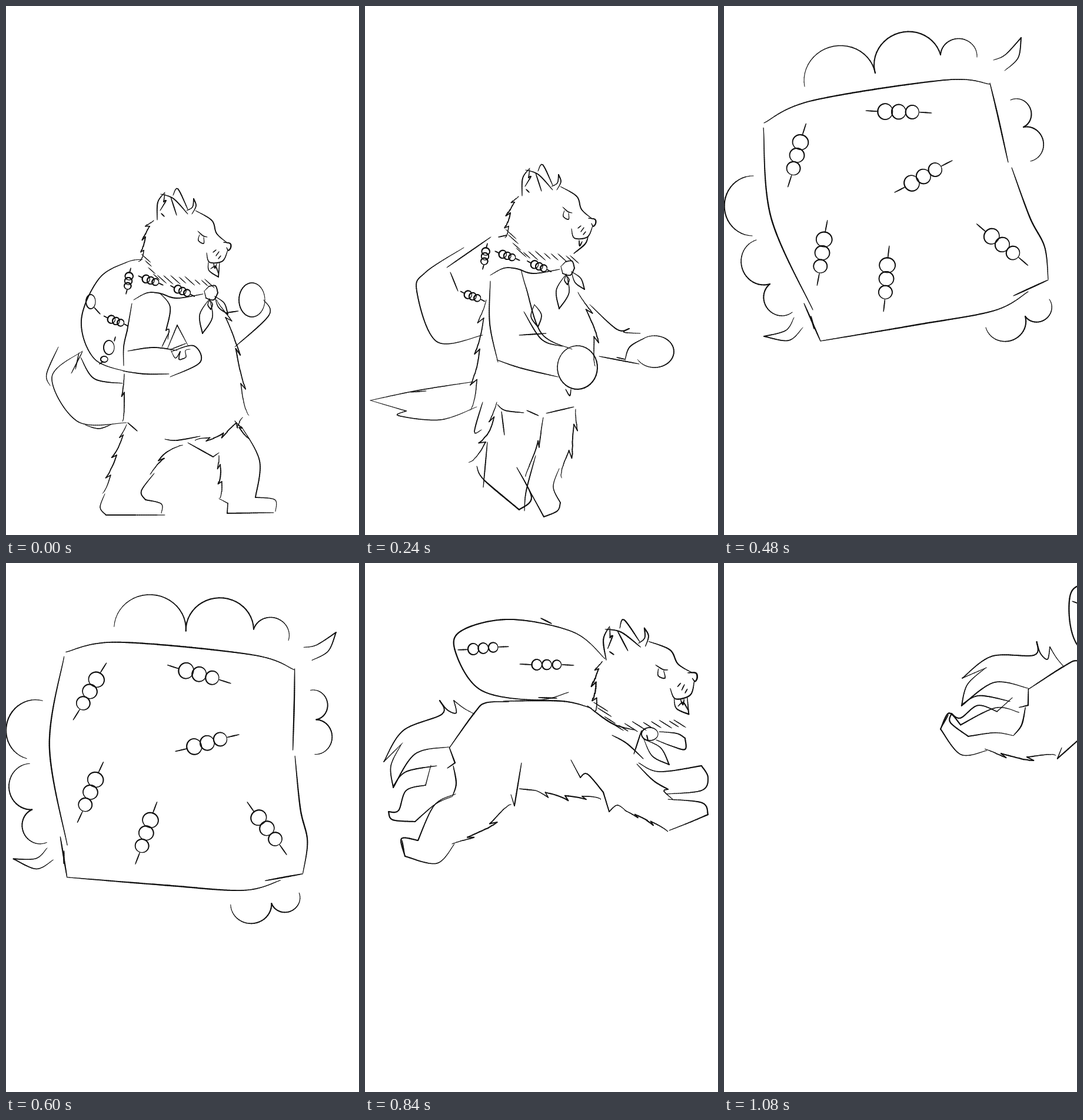
Write an HTML page with a canvas that moves like this. It is 600 by 900 pixels and loops after 1.2 s.

```html
<!DOCTYPE html>
<html lang="en">
<head>
<meta charset="utf-8">
<title>Leaping wolf sketch</title>
<style>
html, body { margin: 0; width: 100%; height: 100%; overflow: hidden; background: #fff; }
canvas { display: block; }
</style>
</head>
<body>
<canvas id="stage" width="600" height="900"></canvas>
<script>
const ctx = document.getElementById('stage').getContext('2d');
const STEP = 120;
let seed;

const random = () => (seed = (seed * 16807) % 2147483647) / 2147483647;
const points = text => text.trim().split(/\s+/).map(p => p.split(',').map(Number));

// Catmull-Rom curve through a few key points
function curve(pts) {
  const out = [pts[0]];
  for (let i = 0; i < pts.length - 1; i++) {
    const a = pts[i - 1] || pts[i], b = pts[i], c = pts[i + 1], d = pts[i + 2] || c;
    const n = Math.max(2, Math.ceil(Math.hypot(c[0] - b[0], c[1] - b[1]) / 3));
    for (let k = 1; k <= n; k++) {
      const t = k / n;
      out.push([0, 1].map(j => b[j] + 0.5 * t * (c[j] - a[j] +
        t * (2 * a[j] - 5 * b[j] + 4 * c[j] - d[j] + t * (3 * (b[j] - c[j]) + d[j] - a[j])))));
    }
  }
  return out;
}

// Pen stroke, thin at both ends
function trace(path, width) {
  for (let i = 1; i < path.length; i++) {
    ctx.lineWidth = width * (0.5 + 0.6 * Math.sin(Math.PI * i / path.length));
    ctx.beginPath();
    ctx.moveTo(...path[i - 1]);
    ctx.lineTo(...path[i]);
    ctx.stroke();
  }
}

// "/" lifts the pen, "|" turns a sharp corner
function ink(text, width = 1.7) {
  for (const line of text.split('/')) {
    let path = [];
    for (const run of line.split('|')) {
      path = path.concat(curve([...path.slice(-1), ...points(run)]));
    }
    trace(path, width);
  }
}

// Tufts along a curve; positive depth points to the right of its direction
function fur(text, tufts, depth, width = 1.7) {
  const base = curve(points(text)), last = base.length - 1, path = [];
  for (let i = 0; i < tufts; i++) {
    const size = depth * (0.7 + 0.6 * random());
    for (let u = i ? -0.2 : 0; u <= 1; u += 0.1) {
      const k = Math.min(last - 1, Math.max(0, Math.floor((i + u) / tufts * last)));
      const [x, y] = base[k], dx = base[k + 1][0] - x, dy = base[k + 1][1] - y;
      const out = size * u * u * Math.sign(u) / Math.hypot(dx, dy);
      path.push([x - dy * out, y + dx * out]);
    }
  }
  trace(path, width);
}

function arc(x, y, rx, ry = rx, from = 0, to = 360, width = 1.7) {
  const path = [];
  for (let i = 0; i <= 40; i++) {
    const a = (from + (to - from) * i / 40) * Math.PI / 180;
    path.push([x + rx * Math.cos(a), y + ry * Math.sin(a)]);
  }
  trace(path, width);
}

// Two bowed sides between a root and a tip
function leaf(x, y, tipX, tipY, fat) {
  const len = Math.hypot(tipX - x, tipY - y);
  const nx = (y - tipY) / len * fat, ny = (tipX - x) / len * fat;
  const mx = (x + tipX) / 2, my = (y + tipY) / 2;
  ink(`${x},${y} ${mx + nx},${my + ny} ${tipX},${tipY} | ${mx - nx},${my - ny} ${x},${y}`);
}

// Cloud bumps on the left of the line from point to point
function puffs(text) {
  const pts = points(text);
  let path = [];
  for (let i = 1; i < pts.length; i++) {
    const [a, b] = [pts[i - 1], pts[i]];
    const ux = (b[0] - a[0]) / 2, uy = (b[1] - a[1]) / 2;
    for (let t = 0; t <= Math.PI; t += Math.PI / 24) {
      const c = Math.cos(t), s = Math.sin(t) * 0.95;
      path.push([a[0] + ux * (1 - c) + uy * s, a[1] + uy * (1 - c) - ux * s]);
    }
  }
  trace(path, 1.9);
}

// Moves the pivot (px, py) to (x, y), then turns and scales around it
function place(px, py, x, y, deg, scale, draw, scaleY = scale) {
  ctx.save();
  ctx.translate(x, y);
  ctx.rotate(deg * Math.PI / 180);
  ctx.scale(scale, scaleY);
  ctx.translate(-px, -py);
  draw();
  ctx.restore();
}

// Three rings threaded on a short string
function chain(x, y, deg, r = 6, gap = r * 1.4, reach = r * 3.7) {
  place(0, 0, x, y, deg, 1, () => {
    for (const i of [-1, 0, 1]) arc(i * gap, 0, r * (1 - i * 0.06), r * (1.04 - i * 0.08), 0, 360, 1.9);
    const e = gap + r;
    ink(`${-reach},-1 ${-e},0 / ${e},0 ${reach},1`);
  });
}

function head(open = true) {
  ink('284,322 292,311 309,346 / 307,348 317,342 319,328 | 323,340 316,354');
  ink('257,364 258,334 270,317 / 263,320 285,328 309,354 / 270,319 268,333 | 272,331 262,348 / 264,353 269,358 / 280,325 290,356');
  ink('322,348 350,365 358,387 376,403 / 377,415 368,434 346,436 341,420');
  ink('370,402 381,404 382,411 378,416 375,411', 2);
  ink('357,415 352,419 / 362,418 357,425 / 365,425 361,430 / 326,383 335,391 342,393 / 329,389 327,399 336,404 336,393', 1.4);
  fur('251,365 238,388 232,437', 4, 6);
  for (const [x, y] of curve(points('238,430 258,463 300,467 346,473')).filter((p, i) => i % 4 === 0)) {
    const len = 4 + 5 * random();
    ink(`${x - len},${y - len} ${x + len},${y + len * 0.8}`, 1.2);
  }
  if (open) ink('344,436 345,450 361,461 | 363,437 / 348,447 356,443 361,455 / 353,438 355,446 358,439');
  else ink('354,440 355,449 359,442 / 369,434 364,446 345,462', 2);
}

function scarf() {
  ink('337,485 345,477 | 356,476 360,488 | 353,500 340,497 | 337,485');
  leaf(346, 498, 334, 557, 11);
  leaf(355, 494, 377, 524, 6);
  leaf(346, 500, 348, 516, 4);
}

function chest() {
  ink('217,500 240,488 262,489 290,497 335,490');
  chain(208, 468, 98);
  chain(187, 536, 20);
  chain(246, 467, 18);
  chain(300, 485, 22);
}

// Standing
function standLegs() {
  fur('205,712 186,770 168,832', 4, 6);
  ink('168,830 160,853 170,866 | 270,866 / 264,863 264,847 237,840 | 230,825 252,795');
  fur('245,797 267,764 299,742', 2, 4);
  ink('309,743 352,767 | 362,760');
  fur('362,765 366,800 368,838', 3, 5);
  ink('362,838 377,846 | 376,863 | 455,862 / 458,860 457,840 424,836 | 431,774 400,715');
  fur('389,706 412,740', 2, -3);
}

function standBody() {
  ink('232,431 205,436 158,464 128,535 150,600 208,623');
  ink('89,580 69,626 75,646 / 130,587 78,632 122,707 205,709 / 135,713 158,719 181,711 / 111,625 130,588 / 118,618 124,590', 1.4);
  ink('127,598 150,634 198,642');
  arc(144, 503, 8, 12);
  arc(175, 581, 9, 12);
  arc(167, 601, 6, 5);
  ink('150,513 160,524 / 184,570 186,563 / 165,605 159,609');
  chest();
  ink('214,506 206,552 | 200,580 200,612 / 261,488 279,512 272,552 | 277,550 275,567');
  ink('207,587 250,581 291,586 / 199,621 235,626 277,626 / 281,588 319,578 330,606 279,631');
  ink('265,580 278,553 / 274,584 291,543 | 309,577 / 278,585 306,574 / 280,585 288,599 296,588 | 294,601 301,600 | 306,597 305,586 313,584', 1.4);
  fur('201,626 201,670 203,708', 2, 5);
  fur('358,500 388,570 406,699', 4, -6);
  fur('402,700 362,731 320,735', 4, -6);
  ink('330,732 290,739 270,737 / 207,709 223,723');
  arc(418, 500, 22, 29);
  ink('374,522 395,519 / 438,500 447,526 389,580');
  scarf();
  head();
}

// Push-off
function push() {
  place(380, 409, 390, 368, 0, 1, () => head(false));
  place(0, 0, -4, -42, 0, 1, () => { chest(); scarf(); });
  ink('168,411 103,453 88,485 122,571 200,560 / 241,390 227,393 / 214,393 139,445 / 145,453 158,485');
  ink('265,448 274,480 300,557 352,584 / 262,560 308,557 / 270,520 300,567 335,579');
  ink('213,468 212,540 226,606 / 224,602 265,616 328,631');
  arc(361, 615, 34, 37, -140, 240, 1.9);
  ink('341,652 348,663 350,652');
  leaf(288, 508, 294, 546, 9);
  fur('362,487 388,550 386,614', 3, -6);
  ink('382,508 428,550 449,549 | 440,555 468,557 / 398,596 466,609 / 428,598 442,601 / 442,602 450,580 475,565');
  arc(492, 588, 33, 27, -125, 150);
  ink('9,671 70,689 | 57,697 128,704 190,682 / 9,671 90,654 186,639 / 78,657 104,655', 1.4);
  fur('206,500 194,590 186,690', 4, 10);
  ink('200,674 186,724 198,721 / 232,690 237,730 / 208,742 201,819');
  fur('224,674 212,725 184,782', 3, 8);
  ink('225,678 238,688 270,692 / 275,688 295,697 / 308,693 355,682');
  ink('190,783 202,806 262,857 / 204,808 262,857 | 283,836 258,785', 2);
  fur('303,700 290,755 268,800', 2, -5);
  fur('358,686 349,750 325,800', 3, -8);
  ink('330,787 320,818 332,845 | 327,859 304,869 | 262,792 / 290,765 274,825 271,859');
}

// Take-off
function rise() {
  place(380, 409, 388, 291, 16.4, 1, head);
  place(0, 0, 5, -142, 0, 1, chest);
  ink('245,268 165,284 82,340 51,400 105,472 175,462 213,424 / 165,282 238,269 / 193,270 250,291 / 165,285 222,302 / 64,420 112,461 191,431', 1.9);
  chain(90, 373, -10, 8, 13);
  chain(126, 424, 83, 8, 13);
  arc(122, 320, 6, 8);
  ink('125,315 139,320 134,307 | 145,317 152,304 | 156,311 172,305');
  ink('211,428 219,392 240,354 / 222,400 244,360 301,388 / 238,383 233,405 247,441 / 222,395 224,427 | 232,410 247,453 | 265,429 308,477');
  fur('289,387 335,405', 2, -3);
  ink('316,420 345,410 417,402 / 283,459 330,478 426,449 / 386,398 409,398 | 406,408 387,407 / 373,432 373,445');
  arc(467, 413, 32, 33, -95, 165, 1.9);
  arc(457, 394, 32, 32, 175, 335);
  ink('432,401 450,386 484,379 / 480,372 482,389 / 411,404 430,382');
  ink('345,335 358,333 | 365,344 355,356 | 345,335');
  leaf(368, 342, 404, 331, 11);
  leaf(350, 354, 385, 375, 9);
  ink('362,359 398,379');
  fur('213,430 203,500 214,605', 4, 7);
  ink('185,518 201,512 / 193,537 181,560 | 201,559');
  fur('403,467 416,515 385,588', 4, -8);
  ink('232,573 248,587 270,591 / 282,587 295,587 335,592 368,580');
  ink('200,508 135,493 65,541 55,570 / 66,573 54,620 73,671 | 67,630 / 77,625 91,646 | 102,621 140,570 / 106,602 135,573 198,541', 1.5);
  ink('200,616 185,630 200,643 | 198,665 208,672 | 150,694 128,730 / 138,737 188,782 / 201,788 230,783 242,766 200,727 / 219,737 255,715 299,684 / 247,711 285,684', 1.9);
  fur('311,600 306,640 294,685', 3, 6);
  fur('362,622 350,670 316,711', 4, -7);
  ink('367,585 369,605 / 367,611 367,630 / 318,707 284,721 239,734 / 248,737 268,758 | 260,770 245,775');
}

// Tumbling sack
function sack() {
  puffs('137,137 257,114 368,83 430,87');
  puffs('487,160 509,206 521,264');
  puffs('553,499 512,528 445,547');
  puffs('48,391 50,289');
  puffs('116,521 78,473 55,398');
  ink('458,92 478,83 505,54 | 500,88 477,110 / 119,530 105,552 68,562 | 110,569 134,547');
  ink('68,199 150,161 375,126 452,133 / 452,131 465,185 483,266 / 489,275 520,360 545,410 551,465 / 551,466 492,493', 2.1);
  ink('517,486 460,518 330,542 164,570 / 164,570 136,506 / 67,207 80,360 151,517 / 148,528 153,549', 2.1);
  for (const [x, y, deg] of [[297, 180, 1], [339, 290, -30], [124, 254, 105], [167, 420, 98], [276, 464, 94], [473, 406, 38]]) {
    chain(x, y, deg, 12, 23, 56);
  }
}

const tumble = turns => place(308, 341, 308 - 8.5 * turns, 341 + 7 * turns, 14.2 * turns, 1, sack);

// Leap: the body tips over along a curve while the hind legs stretch back
function hindLeg() {
  ink('154,393 118,412 90,472 | 62,469 68,499 | 122,511 152,478 / 63,472 67,495', 1.9);
  fur('148,478 205,450 244,405', 3, 6, 1.9);
  ink('248,394 254,413 | 266,340', 1.9);
}

function farLeg() {
  ink('112,344 103,378 | 70,387 57,421 40,423 | 47,437 85,440 | 120,410 149,397', 1.9);
}

function leapBody() {
  place(380, 409, 562, 193, -9.7, 1.18, head);
  ink('408,163 355,118 250,96 170,112 152,145 195,215 290,233 346,220 / 299,94 317,103 / 295,229 326,230', 2);
  chain(201, 145, -5, 8.5, 17, 43);
  chain(309, 173, 0, 8, 17, 46);
  ink('143,315 186,255 205,238 245,236 / 235,235 335,235 385,247 / 378,243 420,273 457,284 / 143,313 153,340 | 140,349 / 150,345 155,375 149,396', 2);
  ink('186,257 168,247 151,234 | 155,255 140,250 127,234 | 131,257 65,285 32,338 | 64,306 / 62,308 44,345 48,382 | 85,325 142,313 / 48,379 70,355 122,345', 1.8);
  ink('262,384 290,387');
  fur('290,387 340,396 402,397', 4, 6, 1.9);
  ink('350,335 366,365 | 378,359 405,390 | 415,423 | 429,412 445,423', 1.9);
  fur('442,421 480,437 517,455', 3, 4, 1.9);
  ink('517,455 550,442 583,428 | 573,408 515,402 / 462,342 490,370 515,385 | 508,388 523,402 / 420,293 445,307 473,333 / 465,340 500,355 572,345 | 583,365 572,387 512,393', 1.9);
  arc(484, 291, 14, 11);
  leaf(474, 300, 517, 343, 10);
  ink('500,287 530,290 544,298 | 544,317 520,311 495,301 / 470,285 457,325 / 479,293 481,302', 1.9);
}

function leap(p) {
  const x = 186 + 392 * p, y = 257 - 332 * p + 252 * p * p;
  place(186, 257, x, y, 21.5 * p, 1, () => {
    leapBody();
    place(266, 340, 266, 340, 17.5 * p, 1, hindLeg);
    place(149, 397, 149, 397, 11.5 * p, 1, farLeg);
  });
}

const poses = [
  () => { standLegs(); standBody(); },
  () => {
    place(300, 866, 302, 866, 0, 1, standLegs, 1.12);
    place(0, 0, 5, -20, 0, 1, standBody);
  },
  push,
  rise,
  () => tumble(0),
  () => tumble(1),
  () => tumble(2),
  () => leap(0),
  () => leap(0.5),
  () => leap(1)
];

ctx.strokeStyle = '#111';
ctx.lineCap = ctx.lineJoin = 'round';
let shown = -1;

function tick() {
  const i = Math.floor(performance.now() / STEP) % poses.length;
  if (i !== shown) {
    shown = i;
    seed = 7919;
    ctx.fillStyle = '#fff';
    ctx.fillRect(0, 0, 600, 900);
    poses[i]();
  }
  requestAnimationFrame(tick);
}
tick();
</script>
</body>
</html>
```
